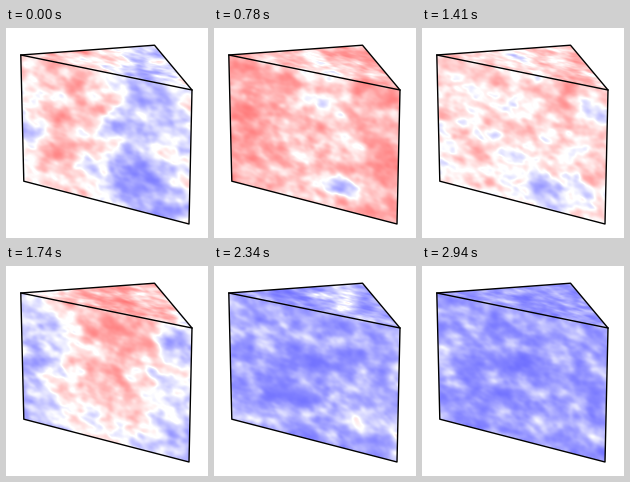
Write a matplotlib script that moves like this. It is 202x210 px and loops after 2.97 s.

```python
import numpy as np
import matplotlib.pyplot as plt
from matplotlib.animation import FuncAnimation
from matplotlib.patches import Polygon

W, H, DPI = 202, 210, 100
FRAMES, STEP = 99, 30

# Corners of the wedge in pixels
A, B, C = (14.8, 27), (148.5, 17.2), (186, 62)
D, E = (17.8, 153.2), (183, 196)

rng = np.random.default_rng(12)
X, Y = np.meshgrid(np.arange(W) + 0.5, np.arange(H) + 0.5)


def edge_y(p, q):
    return p[1] + (X - p[0]) * (q[1] - p[1]) / (q[0] - p[0])


# Unfold both faces onto one plane, joined at the edge A-C
top, bottom = edge_y(A, C), edge_y(D, E)
U = (X - A[0]) / (C[0] - A[0])
V = np.where(Y >= top, (Y - top) / (bottom - top), (Y - top) / 55)


def rough_texture(n=256, k0=6, power=1.9, cutoff=42):
    k = np.fft.fftfreq(n) * n
    kk = k[:, None] ** 2 + k[None, :] ** 2
    amp = (k0 ** 2 + kk) ** (-power / 2) * np.exp(-kk / cutoff ** 2)
    amp[0, 0] = 0
    tex = np.fft.ifft2(np.fft.fft2(rng.standard_normal((n, n))) * amp).real
    return tex / tex.std()


def sample(tex, scale=170):
    n = len(tex)
    y, x = V * scale, U * scale
    i, j = np.floor(y).astype(int), np.floor(x).astype(int)
    a, b = y - i, x - j
    i0, i1, j0, j1 = i % n, (i + 1) % n, j % n, (j + 1) % n
    return ((1 - a) * ((1 - b) * tex[i0, j0] + b * tex[i0, j1])
            + a * ((1 - b) * tex[i1, j0] + b * tex[i1, j1]))


def spot(x, y, r, amp):
    return amp * np.exp(-((X - x) ** 2 + (Y - y) ** 2) / r ** 2)


def state(time, base, swing=0, peak=0, tilt=0, extra=0):
    """Broad wave across the faces, with fine noise of its own."""
    wave = swing * np.cos(2 * np.pi * (U - peak))
    mean = base + wave + tilt * (0.5 - V) + extra
    return time, mean, 0.2 * sample(rough_texture())


states = [
    state(0, -0.06, swing=0.42, peak=0.25, tilt=0.15),
    state(480, 0.66, swing=0.12, peak=0.4),
    state(1080, 0.28, swing=0.28,
          extra=spot(105, 58, 19, -0.7) + spot(124, 160, 22, -0.65)),
    state(1740, 0.02, swing=0.38, peak=0.54, tilt=0.4),
    state(2100, -0.62, swing=0.14, peak=0.95, extra=spot(128, 24, 15, 1)),
    state(2580, -0.62, extra=spot(142, 147, 20, 1)),
    state(2940, -0.66),
]


def field(time):
    for (t0, m0, n0), (t1, m1, n1) in zip(states, states[1:]):
        if time <= t1:
            break
    s = (time - t0) / (t1 - t0)
    ease = s * s * (3 - 2 * s)
    turn = s * np.pi / 2
    return m0 + (m1 - m0) * ease + n0 * np.cos(turn) + n1 * np.sin(turn)


def colours(v):
    mag = np.clip(np.abs(v) - 0.04, 0, None)
    fade = 1 - 0.62 * np.tanh(1.1 * mag)
    return np.dstack([np.where(v > 0, 1, fade), fade,
                      np.where(v > 0, fade, 1)])


fig = plt.figure(figsize=(W / DPI, H / DPI), dpi=DPI, facecolor="white")
ax = fig.add_axes([0, 0, 1, 1])
ax.axis("off")

image = ax.imshow(colours(field(0)), extent=(0, W, H, 0), aspect="auto",
                  interpolation="nearest")
ax.set_xlim(0, W)
ax.set_ylim(H, 0)

outline = Polygon([A, B, C, E, D], closed=True, fill=False, ec="black",
                  lw=1.0, joinstyle="round")
ax.add_patch(outline)
image.set_clip_path(outline)
ax.plot(*zip(A, C), color="black", lw=1.0)


def update(i):
    image.set_data(colours(field(i * STEP)))
    return [image]


anim = FuncAnimation(fig, update, frames=FRAMES, interval=STEP, repeat=True,
                     repeat_delay=0, blit=False)
plt.show()
```
